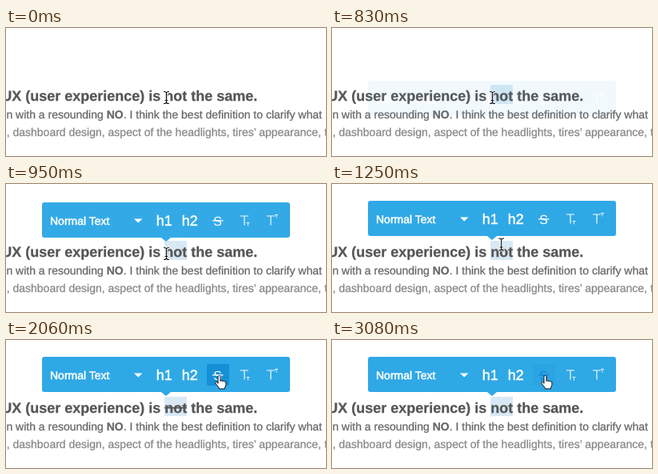
Animation, 400 px wide and 160 px high, one loop 5.26 s. Source, as an HTML page:

```html
<!DOCTYPE html>
<html lang="en">
<head>
<meta charset="utf-8">
<title>Strikethrough toolbar</title>
<style>
html, body { margin: 0; width: 100%; height: 100%; overflow: hidden; background: #fff; }
svg { display: block; width: 400px; height: 160px; font: 14px "Liberation Sans", Arial, sans-serif; }
text { white-space: pre; text-rendering: geometricPrecision; stroke-width: .25; }
.title { font-size: 18px; font-weight: bold; }
.label { stroke: #fff; stroke-width: .5; }
.head { font-size: 18px; }
.line { fill: none; stroke: #fff; }
</style>
</head>
<body>
<svg viewBox="0 0 400 160">
  <rect id="sel" x="198" y="71" width="28" height="24" fill="#d8e9f5"/>
  <text class="title" x="-5.8" y="91" fill="#555" stroke="#555">UX (user experience) is not the same.</text>
  <rect id="strike" x="198" y="84" width="28" height="1.6" fill="#555"/>
  <text x=".4" y="113" fill="#666" stroke="#666">n with a resounding <tspan font-weight="bold">NO</tspan>. I think the best definition to clarify what</text>
  <text x=".7" y="135" fill="#868686" stroke="#868686">, dashboard design, aspect of the headlights, tires’ appearance, t</text>

  <g id="bar" fill="#fff">
    <path fill="#2fa8e6" d="M48 21H352a3 3 0 0 1 3 3V62a3 3 0 0 1-3 3H206l-6 5-6-5H48a3 3 0 0 1-3-3V24a3 3 0 0 1 3-3z"/>
    <rect id="cell" x="251" y="30" width="28" height="27" rx="2" fill="#1590d6"/>
    <text class="label" x="55" y="48.500">Normal Text</text>
    <path d="M160 41.500h10.500l-5.250 5z"/>
    <text class="label head" x="187.700" y="50">h1</text>
    <text class="label head" x="219.800" y="50">h2</text>
    <g id="s">
      <text x="264.700" y="49.500" font-size="16" text-anchor="middle">S</text>
      <path d="M258 43.200h13.500v1.300H258z"/>
    </g>
    <g class="line" stroke-width="1.200" opacity=".95">
      <path d="M293 38h10M298 38v11.500M326 38h10M331 38v11.500"/>
      <path stroke-width=".9" d="M300.500 46.500h4M302.500 46.500v4M336 36.500h4M338 36.500v4"/>
    </g>
  </g>

  <g id="beam" fill="none" stroke-linecap="round">
    <path id="ibar" stroke-width="2.600" stroke="#fff" d="M-3-7.500q3 0 3 2V5.500q0 2-3 2M3-7.500q-3 0-3 2V5.500q0 2 3 2M-1.500 3.500h3"/>
    <path stroke-width="1.100" stroke="#111" d="M-3-7.500q3 0 3 2V5.500q0 2-3 2M3-7.500q-3 0-3 2V5.500q0 2 3 2M-1.500 3.500h3"/>
  </g>
  <path id="hand" fill="#fff" stroke="#111" stroke-linejoin="round"
    d="M-1.500 1.500c0-2 3-2 3 0V7c0-1.200 2.400-1.200 2.500.3c.2-1 2.300-.9 2.400.4c.3-.7 2-.6 2 .8V11c0 2-1.500 3-1.500 5.500H0C-.5 14-3.500 11.500-4.700 9.300c-.6-1.300 1-2 2-.9L-1.500 9.800z"/>
</svg>
<script>
const LOOP = 5260, STEP = 30, PHASE = 20;
const [sel, strike, bar, cell, s, beam, hand] =
  ["sel", "strike", "bar", "cell", "s", "beam", "hand"].map(id => document.getElementById(id));

const part = (t, a, b) => Math.min(1, Math.max(0, (t - a) / (b - a)));
const smooth = u => u * u * (3 - 2 * u);
const sineOut = u => Math.sin(u * Math.PI / 2);
const mix = (a, b, u) => a + (b - a) * u;
const mixRGB = (a, b, u) => `rgb(${a.map((v, i) => Math.round(mix(v, b[i], u)))})`;
const show = (node, on) => node.setAttribute("visibility", on ? "visible" : "hidden");

function draw(time) {
  const t = Math.floor((time - PHASE) / STEP) * STEP + PHASE;

  show(sel, t >= 560);
  const drop = Math.round(50 * (1 - sineOut(part(t, 820, 975))));
  bar.setAttribute("transform", `translate(0 ${drop})`);
  bar.setAttribute("opacity", sineOut(part(t, 825, 970)));

  const press = smooth(part(t, 1670, 2060));
  const release = smooth(part(t, 2690, 3080));
  cell.setAttribute("opacity", press * mix(1, .15, release));
  s.setAttribute("fill", mixRGB([255, 255, 255], [21, 135, 208], release));
  show(strike, t >= 1850 && t < 2870);

  const x = mix(200.5, 266.5, smooth(part(t, 1130, 1590)));
  const y = mix(87, 44.5, smooth(part(t, 1130, 1480)));
  const over = y < 65;
  show(beam, !over);
  show(hand, over);
  (over ? hand : beam).setAttribute("transform", `translate(${x} ${y})`);
}

const start = performance.now();
function tick() {
  draw((performance.now() - start) % LOOP);
  requestAnimationFrame(tick);
}
tick();
</script>
</body>
</html>
```
